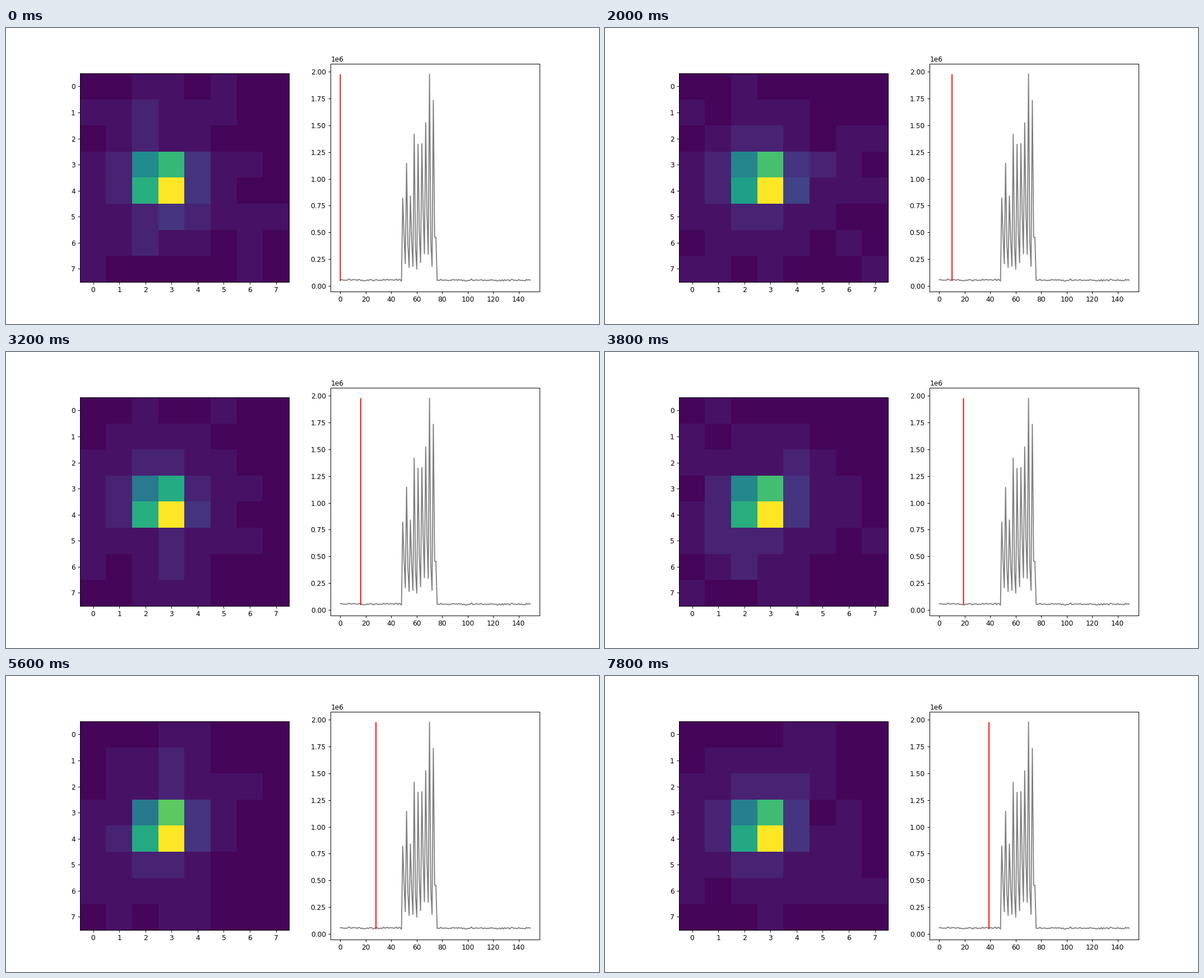
These frames come from a looping animation (1058x529 px, 8 s). A matplotlib script:

```python
import numpy as np
import matplotlib.pyplot as plt
from matplotlib.animation import FuncAnimation

W, H = 1058, 529
FIG_W, FIG_H = 12, 6
FRAMES, STEP_MS = 40, 200
SIZE = 8
SPOT_ROW, SPOT_COL = 3.588, 2.678


def spot_profile():
    """Mean brightness: a sharp spot on a wide, faint halo, peak at 1."""
    row, col = np.mgrid[:SIZE, :SIZE]
    dr2, dc2 = (row - SPOT_ROW) ** 2, (col - SPOT_COL) ** 2
    sharp = np.exp(-dr2 / 0.396 - dc2 / 0.652)
    halo = np.exp(-(dr2 + dc2) / 8)
    spot = sharp / sharp.max() + 0.13 * halo
    return spot / spot.max()


PROFILE = spot_profile()


def heat(step):
    """Noisy spot; dim cells fall on coarse count levels."""
    rng = np.random.default_rng(100 + step)
    grid = PROFILE + rng.normal(0, 0.014 + 0.03 * PROFILE)
    grid = np.where(grid < 0.22, np.round(grid / 0.05) * 0.05, grid)
    grid[PROFILE == 1] = 1
    return np.clip(grid, 0.015, 1)


def total_signal():
    """Quiet baseline with a burst of nine peaks, in thousands."""
    rng = np.random.default_rng(7)
    x = np.arange(150)
    y = np.clip(rng.normal(np.where(x < 76, 57, 54), 5), 46, 68)
    y[48] = 45
    lows = np.array([207, 172, 183, 157, 217, 300, 295, 183])
    y[49:74:3] = [820, 1145, 840, 1417, 1322, 1328, 1522, 1977, 1733]
    y[50:73:3] = 2.3 * lows
    y[51:73:3] = lows
    y[74:76] = 455
    return x, y * 1e3


fig, (left, right) = plt.subplots(1, 2, figsize=(FIG_W, FIG_H), dpi=W / FIG_W)
fig.subplots_adjust(top=0.879)

image = left.imshow(heat(0), cmap="viridis", vmin=0, vmax=1)
left.set_xticks(range(SIZE))
left.set_yticks(range(SIZE))

x, y = total_signal()
low, high = y.min(), y.max()
pad = 0.05 * (high - low)
right.plot(x, y, color="gray")
cursor = right.vlines(0, low, high, color="red", zorder=3)
cursor.set_snap(False)
right.set_xticks(range(0, 150, 20))
right.set_xlim(-7.45, 156.45)
right.set_ylim(low - pad, high + pad)


def update(step):
    image.set_data(heat(step))
    cursor.set_segments([[(step, low), (step, high)]])
    return image, cursor


anim = FuncAnimation(fig, update, frames=FRAMES, interval=STEP_MS,
                     repeat=True, repeat_delay=0)
plt.show()
```
